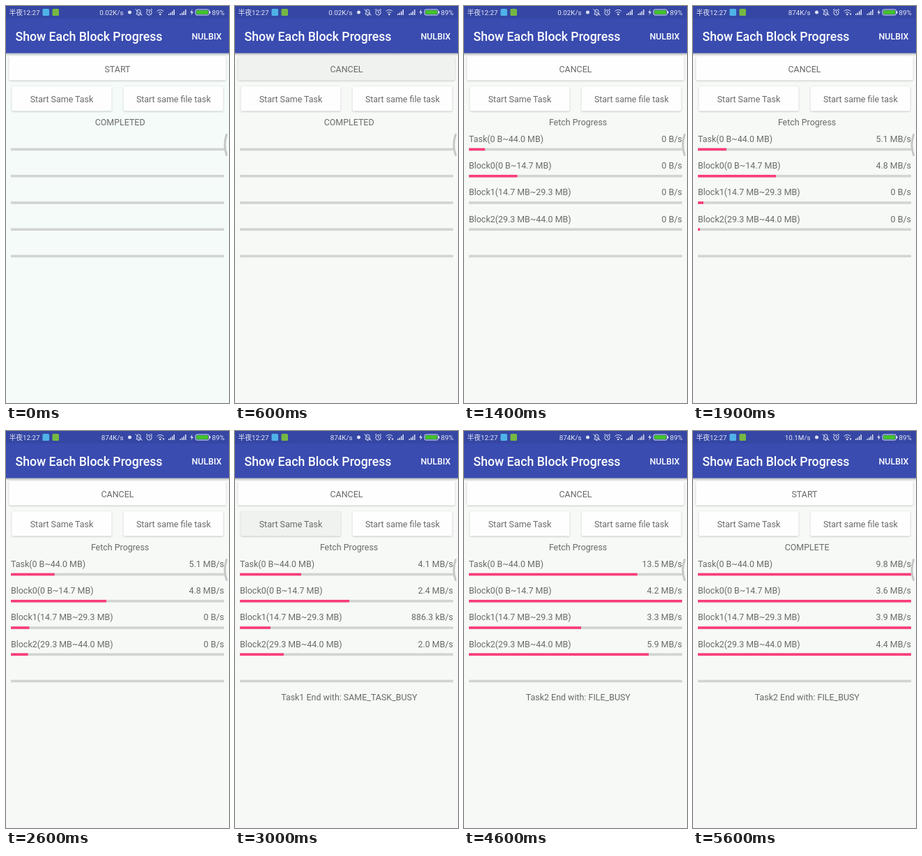
An HTML page for the animation above (5800 ms loop, 320 by 569 pixels).

```html
<!DOCTYPE html>
<html lang="en">
<head>
<meta charset="utf-8">
<title>Block progress</title>
<style>
  html, body { margin: 0; width: 100%; height: 100%; overflow: hidden; }
  svg { display: block; width: 100%; height: 100%; }
  text { font: 12.44px Roboto, "Noto Sans CJK SC", "Noto Sans CJK JP", sans-serif; fill: #696b69; }
  .mid { text-anchor: middle; }
  .end { text-anchor: end; }
  .bar text { fill: #fff; font-weight: 500; }
  .bar .title { font-size: 17.7px; }
  .status text { font-size: 9.8px; fill: #e6e9f8; }
  .line { fill: none; stroke: #dde1f4; stroke-width: 1; }
  .solid { fill: #dde1f4; }
  .btn { fill: #fdfefd; filter: url(#lift); }
</style>
</head>
<body>
<svg viewBox="0 0 320 569" preserveAspectRatio="none">
  <defs>
    <filter id="lift" x="-5%" y="-15%" width="110%" height="140%">
      <feDropShadow dx="0" dy=".8" stdDeviation=".9" flood-opacity=".3"/>
    </filter>
    <linearGradient id="fade" x2="0" y2="1">
      <stop stop-color="#000" stop-opacity=".28"/>
      <stop offset="1" stop-color="#000" stop-opacity="0"/>
    </linearGradient>
  </defs>
  <rect id="page" width="320" height="569"/>
  <rect y="67.5" width="320" height="4" fill="url(#fade)"/>

  <g class="bar">
    <rect width="320" height="67.6" fill="#3a4cb0"/>
    <rect width="320" height="17.8" fill="#3546a4"/>
    <text class="title" x="13.5" y="49.7">Show Each Block Progress</text>
    <text class="end" x="309.5" y="47.5">NULBIX</text>
  </g>

  <g class="status">
    <text x="4.5" y="12.7">半夜12:27</text>
    <rect x="52.5" y="4" width="9.5" height="10" rx="1.5" fill="#4fb3e8"/>
    <rect x="66.5" y="4" width="9.5" height="10" rx="1.5" fill="#76b843"/>
    <text id="net" class="end" x="168.5" y="12.7"></text>
    <circle class="solid" cx="177.5" cy="9" r="2.5"/>
    <path class="line" d="M187 12h7l-1-2V7.500a2.500 2.500 0 0 0-5 0V10zM189.500 13.500h2M185.500 4.500l10 9"/>
    <g class="line">
      <circle cx="205.500" cy="9.300" r="3.700"/>
      <path d="M205.500 7v2.500l1.700 1M201 6l2-2M210 6l-2-2"/>
    </g>
    <path class="line" d="M216.500 7.500a6.700 6.700 0 0 1 9.600 0M218.500 9.800a4 4 0 0 1 5.600 0"/>
    <circle class="solid" cx="221.300" cy="12" r="1.300"/>
    <path id="traffic" class="solid" d="M224.500 10.500h3l-1.500 3z"/>
    <path id="cell" class="solid" d="M233 11h1.500v2H233zM235.500 9.500h1.500V13h-1.500zM238 7.500h1.500V13H238zM240.500 5h1.500v8h-1.500z"/>
    <use href="#cell" x="16.500"/>
    <path class="solid" d="M267.500 4.500l-3.300 5h2.300l-1 4 3.500-5.200h-2.400z"/>
    <rect class="line" x="272" y="5" width="19.500" height="8" rx="2"/>
    <rect x="273.200" y="6.200" width="17" height="5.600" rx="1" fill="#43c528"/>
    <rect class="solid" x="292" y="7.500" width="1.500" height="3"/>
    <text x="295.500" y="12.700">89%</text>
  </g>

  <rect id="main" class="btn" x="4.500" y="72" width="311" height="34.300" rx="1.500"/>
  <rect id="same" class="btn" x="8.700" y="115.300" width="142.600" height="35" rx="1.500"/>
  <rect id="file" class="btn" x="168.900" y="115.300" width="142.600" height="35" rx="1.500"/>
  <text id="action" class="mid" x="160" y="94.500"></text>
  <text class="mid" x="80" y="138">Start Same Task</text>
  <text class="mid" x="240.300" y="138">Start same file task</text>
  <text id="state" class="mid" x="163.600" y="171"></text>
  <g id="rows"></g>
  <text id="note" class="mid" x="163.800" y="386"></text>
  <path d="M316.500 184.500Q311.500 199 316.500 213.500" fill="none" stroke="#c6c8c6" stroke-width="3" stroke-linecap="round"/>
</svg>
<script>
const LOOP = 5800, FULL = 306;
const $ = id => document.getElementById(id);

// Each pair is [time in ms, value]
const net = [[0, '0.02K/s'], [1700, '874K/s'], [5400, '10.1M/s']];
const action = [[0, 'START'], [600, 'CANCEL'], [5200, 'START']];
const state = [[0, 'COMPLETED'], [800, 'Fetch Progress'], [5200, 'COMPLETE']];
const note = [[0, ''], [2900, 'Task1 End with: SAME_TASK_BUSY'], [3800, 'Task2 End with: FILE_BUSY']];
const labels = ['Task(0 B~44.0 MB)', 'Block0(0 B~14.7 MB)', 'Block1(14.7 MB~29.3 MB)', 'Block2(29.3 MB~44.0 MB)', ''];
const speeds = [
  [[0, ''], [800, '0 B/s'], [1700, '5.1 MB/s'], [2700, '4.1 MB/s'], [3800, '13.5 MB/s'], [5000, '9.8 MB/s']],
  [[0, ''], [800, '0 B/s'], [1700, '4.8 MB/s'], [2700, '2.4 MB/s'], [4200, '4.2 MB/s'], [4700, '3.6 MB/s']],
  [[0, ''], [1400, '0 B/s'], [2800, '886.3 kB/s'], [3800, '3.3 MB/s'], [5200, '3.9 MB/s']],
  [[0, ''], [1400, '0 B/s'], [2800, '2.0 MB/s'], [4200, '5.9 MB/s'], [4900, '4.4 MB/s']],
  [[0, '']]
];
const blocks = [
  [[800, 0], [1100, 44], [1900, 112], [2300, 132], [2500, 132], [3000, 157], [3100, 157], [3700, 229], [3800, 229], [4300, 284], [4600, FULL]],
  [[1600, 0], [1900, 8], [2200, 15], [2300, 22], [2500, 22], [3000, 44], [3700, 44], [3800, 68], [4300, 107], [4600, 161], [5200, FULL]],
  [[1600, 0], [1900, 3], [2200, 15], [2500, 15], [3000, 63], [3100, 63], [3800, 156], [4600, 258], [4900, FULL]]
];

const step = (keys, t) => keys.filter(k => k[0] <= t).pop()[1];

function glide(keys, t) {
  const i = keys.findIndex(k => k[0] > t);
  if (i < 0) return keys[keys.length - 1][1];
  if (i === 0) return keys[0][1];
  const [t0, a] = keys[i - 1], [t1, b] = keys[i];
  return a + (b - a) * (t - t0) / (t1 - t0);
}

$('rows').innerHTML = labels.map((_, i) => {
  const y = 203.7 + i * 38.25;
  return `<text id="label${i}" x="7" y="${y - 8.8}"></text>
    <text id="speed${i}" class="end" x="313" y="${y - 8.8}"></text>
    <rect x="7" y="${y}" width="${FULL}" height="3.6" fill="#d2d4d2"/>
    <rect id="fill${i}" x="7" y="${y}" height="3.6" fill="#fb3c7a"/>`;
}).join('');

function press(id, t, from, to) {
  $(id).style.fill = t >= from && t < to ? '#f0f2f0' : '';
}

function draw(now) {
  const t = Math.floor(now % LOOP / 100) * 100;
  const done = blocks.map(keys => glide(keys, t));
  const widths = [(done[0] + done[1] + done[2]) / 3, ...done, 0];

  $('page').setAttribute('fill', t < 500 ? '#f4fbf9' : '#f6f9f6');
  $('net').textContent = step(net, t);
  $('traffic').style.display = t < 1700 ? 'none' : '';
  $('action').textContent = step(action, t);
  $('state').textContent = step(state, t);
  $('note').textContent = step(note, t);
  press('main', t, 500, 800);
  press('same', t, 2700, 3100);
  press('file', t, 3900, 4300);
  labels.forEach((label, i) => {
    $('label' + i).textContent = t < 800 ? '' : label;
    $('speed' + i).textContent = step(speeds[i], t);
    $('fill' + i).setAttribute('width', widths[i]);
  });
  requestAnimationFrame(tick);
}

const start = performance.now();
const tick = () => draw(performance.now() - start);
tick();
</script>
</body>
</html>
```
